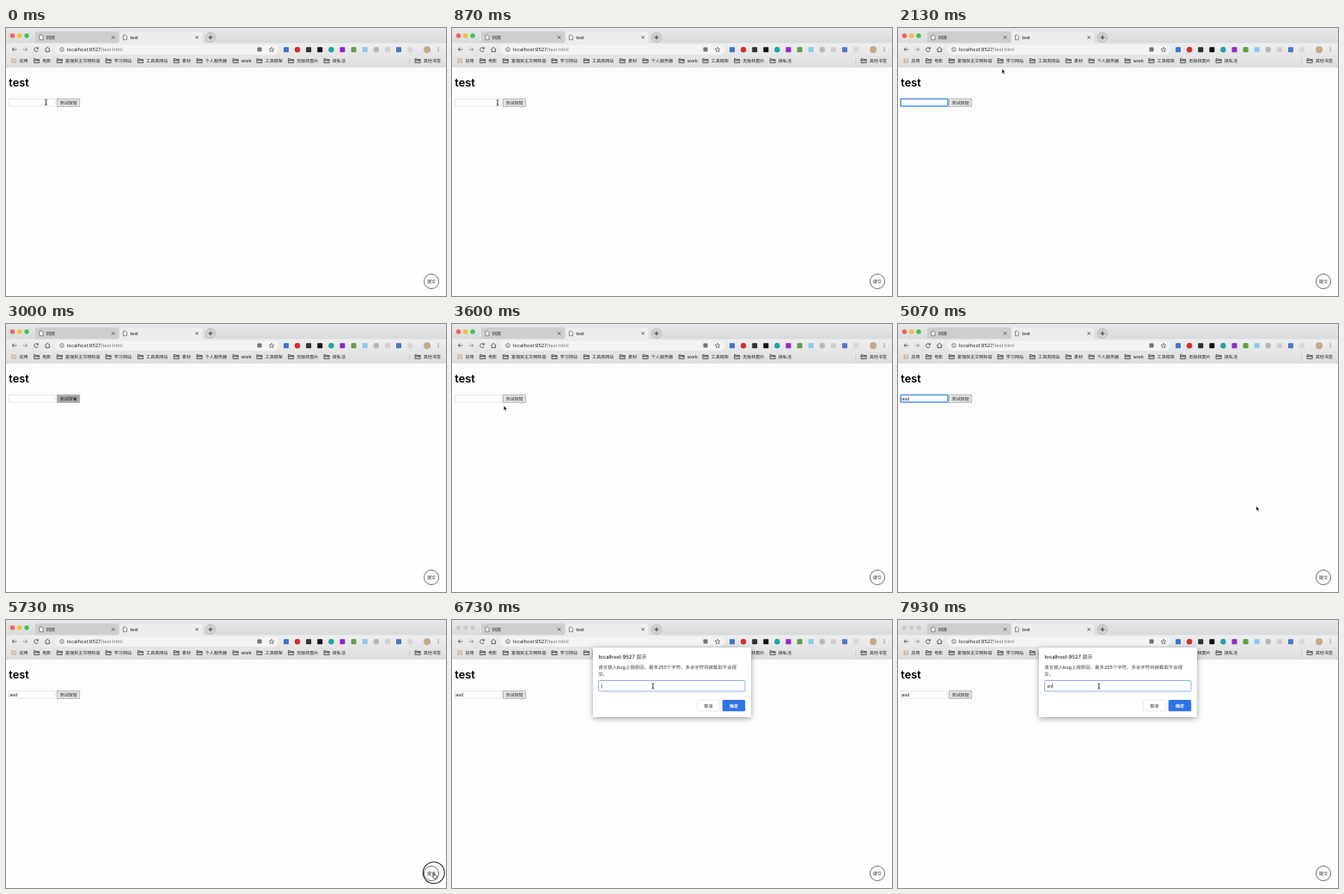
An HTML page that plays this animation: 512x312 px, repeating every 8000 ms.

```html
<!DOCTYPE html>
<html lang="zh">
<head>
<meta charset="utf-8">
<style>
  html, body { margin: 0; width: 100%; height: 100%; overflow: hidden; background: #ccc; }
  svg { display: block; width: 512px; height: 312px; }
  text { font: 500 5.06px Inter, "Noto Sans CJK SC", sans-serif; fill: #222; text-rendering: geometricPrecision; white-space: pre; }
  .mid { text-anchor: middle; }
  .field { font-family: "Liberation Sans", Arial, sans-serif; font-size: 5.5px; fill: #111; }
  .line { fill: none; stroke: #444; stroke-width: .8; }
</style>
</head>
<body>
<svg viewBox="0 0 512 312">
  <defs>
    <filter id="shadow" x="-10%" y="-15%" width="120%" height="140%">
      <feDropShadow dx="0" dy="1.5" stdDeviation="3" flood-opacity=".38"/>
    </filter>
    <linearGradient id="frame" x2="0" y2="1">
      <stop stop-color="#e6e7e8"/><stop offset="1" stop-color="#d9dadb"/>
    </linearGradient>
    <linearGradient id="bar" x2="0" y2="1">
      <stop stop-color="#ededee"/><stop offset="1" stop-color="#dedede"/>
    </linearGradient>
  </defs>
  <rect width="512" height="312" rx="1.500" fill="#fdfdfd"/>
  <path d="M0 18V1.500Q0 0 1.500 0H510.500Q512 0 512 1.500V18Z" fill="url(#frame)"/>
  <path d="M32 18Q34 17.500 34 15V6.500Q34 4 36.500 4H129Q131.500 4 131.500 6.500V18Z" fill="#cdced0"/>
  <rect y="17.500" width="512" height="28" fill="url(#bar)"/>
  <path d="M129.500 18Q132 17.500 132 15V6.500Q132 4 134.500 4H226Q228.500 4 228.500 6.500V15Q228.500 17.500 231 18Z" fill="#ededee"/>
  <path d="M0 45.300H512" stroke="#cacaca" stroke-width=".6"/>
  <g id="lights"></g>

  <!-- toolbar -->
  <rect x="57" y="19.500" width="260" height="11.500" rx="5.700" fill="#f4f4f4"/>
  <g class="line">
    <path d="M12.300 25H7.200M9.600 22.600L7.200 25L9.600 27.400"/>
    <path d="M19.700 25H24.800M22.400 22.600L24.800 25L22.400 27.400" stroke="#888"/>
    <path d="M37 23.700A2.400 2.400 0 1 0 37.300 26M37.500 22.200V24.200H35.500"/>
    <path d="M45.300 25L48.300 22.300L51.300 25M46.200 24.500V27.600H50.400V24.500"/>
    <circle cx="65" cy="25" r="2.300" stroke-width=".6"/>
    <path d="M65 24.700V26.300M65 23.500V24.100" stroke-width=".6"/>
    <path d="M309 22.300L309.800 24.200L311.900 24.400L310.300 25.700L310.800 27.700L309 26.600L307.200 27.700L307.700 25.700L306.100 24.400L308.200 24.200Z" stroke-width=".6"/>
    <path d="M469.500 35V42" stroke="#bbb" stroke-width=".5"/>
    <circle cx="238" cy="11" r="5.800" style="fill:#d0d1d3;stroke:#a4a5a7;stroke-width:.5"/>
    <path d="M235.500 11H240.500M238 8.500V13.500" stroke="#222"/>
  </g>
  <g id="chrome"></g>
  <text x="71" y="27" style="font-size:5.68px;font-weight:400">localhost:9527<tspan fill="#777">/test.html</tspan></text>

  <!-- page -->
  <text x="3.300" y="67.700" style="font-size:12.8px;font-weight:600;fill:#000">test</text>
  <rect x="3.400" y="82.700" width="54.200" height="8.300" fill="#fff" stroke="#dcdcdc" stroke-width=".7"/>
  <rect id="focus" x="3.100" y="82.600" width="54.800" height="8.500" rx=".8" fill="none" stroke="#5094ec" stroke-width="1.500"/>
  <text id="typed" class="field" x="4.300" y="88.800"></text>
  <path id="caret" d="M0 84.300V89.700" stroke="#111" stroke-width=".6"/>
  <rect id="button" x="59.400" y="82.700" width="26.400" height="8.600" stroke="#a0a0a0" stroke-width=".7"/>
  <text class="mid" x="72.700" y="88.900" fill="#000">测试按钮</text>
  <circle cx="495" cy="295" r="8.500" fill="#fff" stroke="#333" stroke-width=".7"/>
  <text class="mid" x="495" y="296.900" fill="#000">提交</text>
  <circle id="ripple" cx="497.800" cy="294.300" fill="none" stroke="#222" stroke-width="1.100"/>

  <g id="dialog">
    <rect x="164" y="32" width="184" height="81" rx="1.500" fill="#fff" filter="url(#shadow)"/>
    <text x="170.500" y="45.300" style="font-size:6px">localhost:9527 显示</text>
    <text x="170.300" y="57" style="font-size:5.43px;fill:#444">请言输入bug上报原因，最多255个字符。多余字符将被截取不会提</text>
    <text x="170.300" y="65" style="font-size:5.43px;fill:#444">交。</text>
    <rect x="170.500" y="70.500" width="170.500" height="12.500" rx="1.200" fill="#fff" stroke="#7ea6ec" stroke-width=".9"/>
    <text id="answer" x="173.600" y="78.600" style="font-weight:400"></text>
    <path id="answerCaret" d="M0 73.800V79.800" stroke="#222" stroke-width=".6"/>
    <rect x="285.200" y="93.200" width="26.400" height="12.900" rx="1.500" fill="#fff" stroke="#d9d9d9" stroke-width=".5"/>
    <rect x="314.700" y="93" width="26.500" height="13.200" rx="1.500" fill="#2f73e8"/>
    <text class="mid" x="298.300" y="101.600">取消</text>
    <text class="mid" x="328" y="101.600" style="fill:#fff;font-weight:600">确定</text>
  </g>

  <g id="cursor">
    <path id="arrow" d="M0 0V5.600L1.300 4.400L2.200 6.500L3.100 6.100L2.200 4.100H3.900Z" fill="#111" stroke="#fff" stroke-width=".4"/>
    <path id="beam" d="M-1.400 -3.200Q0 -3.200 0 -2.400Q0 -3.200 1.400 -3.200M0 -2.500V2.500M-1.400 3.200Q0 3.200 0 2.400Q0 3.200 1.400 3.200M-.7 .8H.7" fill="none" stroke="#111" stroke-width=".7"/>
    <path id="hand" d="M-.6 .6Q0 -.4 .6 .6V2.600L3 3.100Q3.800 3.400 3.700 4.300L3.200 6.800H.3L-1.700 4.300Q-1.500 3.300 -.6 4Z" fill="#fff" stroke="#111" stroke-width=".7"/>
  </g>
</svg>
<script>
const $ = id => document.getElementById(id);
const show = (id, on) => $(id).setAttribute('visibility', on ? 'inherit' : 'hidden');
const dot = (x, y, r, fill) => `<circle cx="${x}" cy="${y}" r="${r}" fill="${fill}"/>`;
const square = (x, y, size, fill) =>
  `<rect x="${x - size / 2}" y="${y - size / 2}" width="${size}" height="${size}" rx=".8" fill="${fill}"/>`;
const label = (x, y, s) => `<text x="${x}" y="${y}">${s}</text>`;
const folder = x => `<path class="line" style="stroke-width:.7;fill:#bbb" d="M${x} 40.600V35.700H${x + 2.200}L${x + 3} 36.500H${x + 6.200}V40.600ZM${x} 37.500H${x + 6.200}"/>`;
const tab = (x, title) =>
  `<path d="M${x} 8.200H${x + 2.600}L${x + 4} 9.600V13.700H${x}Z" fill="#fff" stroke="#444" stroke-width=".6"/>` +
  label(x + 8, 12.900, title) +
  `<path class="line" d="M${x + 84} 9.200l3.400 3.400m0 -3.400l-3.400 3.400"/>`;

const folders = [[32.500, '电影'], [59.300, '富强民主文明和谐'], [116, '学习网站'], [153.300, '工具类网站'],
  [195.200, '素材'], [222, '个人服务器'], [264, 'work'], [291.800, '工具框架'],
  [328.500, '无版权图片'], [370, '接私活'], [476, '其他书签']];
const extensions = ['#3f78c8', '#d32f2f', '#333', '#151515', '#1fa5a5', '#9328c8',
  '#5f9f4a', '#8cc9ee', '#b5b5b5', '#cfcfcf', '#4a78c8', '#d8d8d8'];
const round = [1, 4, 8];

let apps = '';
for (let i = 0; i < 9; i++)
  apps += square(7.200 + i % 3 * 1.900, 36.200 + (i / 3 | 0) * 1.900, 1.300, ['#d8604a', '#e0a040', '#7c9a6a'][i % 3]);

$('chrome').innerHTML = tab(39, '回放') + tab(136.500, 'test') + apps + label(15.500, 39.900, '应用') +
  folders.map(([x, name]) => folder(x) + label(x + 9.800, 39.900, name)).join('') +
  extensions.map((c, i) => round.includes(i) ? dot(326 + 13.100 * i, 25.300, 3.200, c) : square(326 + 13.100 * i, 25.300, 6, c)).join('') +
  square(295, 25, 5, '#6d7480') + dot(490, 25.300, 4, '#c3aa8a') +
  [23, 25, 27].map(y => dot(503, y, .6, '#444')).join('');

// Pointer way-points: time, x, y
const path = [[0, 46.500, 86.500], [470, 40, 87], [870, 53, 87], [1250, 53, 87], [1260, 31, 87], [1470, 31, 87],
  [2130, 121, 47.500], [2270, 121, 47.500], [2870, 79, 84.500], [3200, 79, 84.500], [3530, 64, 96], [3870, 30, 87],
  [4400, 30, 87], [4930, 407, 202], [5600, 497.800, 294.300], [5870, 497.800, 294.300], [6600, 233.800, 77], [8000, 233.800, 77]];

function pointerAt(t) {
  const i = path.findIndex((p, k) => k && t <= p[0]);
  const [t0, x0, y0] = path[i - 1], [t1, x1, y1] = path[i];
  const u = (t - t0) / (t1 - t0), e = u * u * (3 - 2 * u);
  return [x0 + (x1 - x0) * e, y0 + (y1 - y0) * e];
}

const between = (t, a, b) => t >= a && t < b;
const blink = (t, start) => (t - start) % 1000 < 500;
const typedText = (text, times, t) => text.slice(0, times.filter(k => t >= k).length);

function setField(textId, caretId, x, text, on) {
  const el = $(textId);
  if (el.textContent !== text) el.textContent = text;
  const width = text ? el.getComputedTextLength() : 0;
  $(caretId).setAttribute('transform', `translate(${x + width + .5})`);
  show(caretId, on);
}

function draw(t) {
  const dialog = t >= 6330;
  const focused = between(t, 1530, 2930) || between(t, 3860, 5660);
  const pressed = between(t, 2930, 3130);
  const [x, y] = pointerAt(t);

  show('focus', focused);
  setField('typed', 'caret', 4.300, typedText('asd', [4130, 4200, 4260], t),
    focused && blink(t, t < 3000 ? 1530 : t < 4260 ? 3860 : 4260));
  $('button').setAttribute('fill', pressed ? '#a9a9a9' : '#e4e4e4');
  show('ripple', between(t, 5660, 5790));
  $('ripple').setAttribute('r', t < 5725 ? 9.500 : 12.500);

  $('lights').innerHTML = ['#f4605a', '#f6bd3b', '#3fc44c']
    .map((c, i) => dot(7.500 + 8.300 * i, 9, 2.700, dialog ? '#c8c9ca' : c)).join('');
  show('dialog', dialog);
  setField('answer', 'answerCaret', 173.600, typedText('sh', [7800, 7920], t),
    dialog && (t >= 7800 || blink(t, 6330)));

  const inField = between(x, 3, 58) && between(y, 82.500, 91.500);
  const inAnswer = dialog && between(x, 170, 341) && between(y, 70, 83);
  const beam = inField || inAnswer;
  const hand = !dialog && Math.hypot(x - 495, y - 295) < 8.500;
  show('cursor', !between(t, 4130, 4400));
  $('cursor').setAttribute('transform', `translate(${x} ${y})`);
  for (const [id, on] of [['beam', beam], ['hand', hand], ['arrow', !beam && !hand]])
    $(id).setAttribute('display', on ? 'inline' : 'none');
}

const STEP = 1000 / 15;
const start = performance.now();
function tick() {
  const t = (performance.now() - start) % 8000;
  draw(Math.min(Math.floor((t + 5) / STEP) * STEP, 7999));
  requestAnimationFrame(tick);
}
tick();
</script>
</body>
</html>
```
